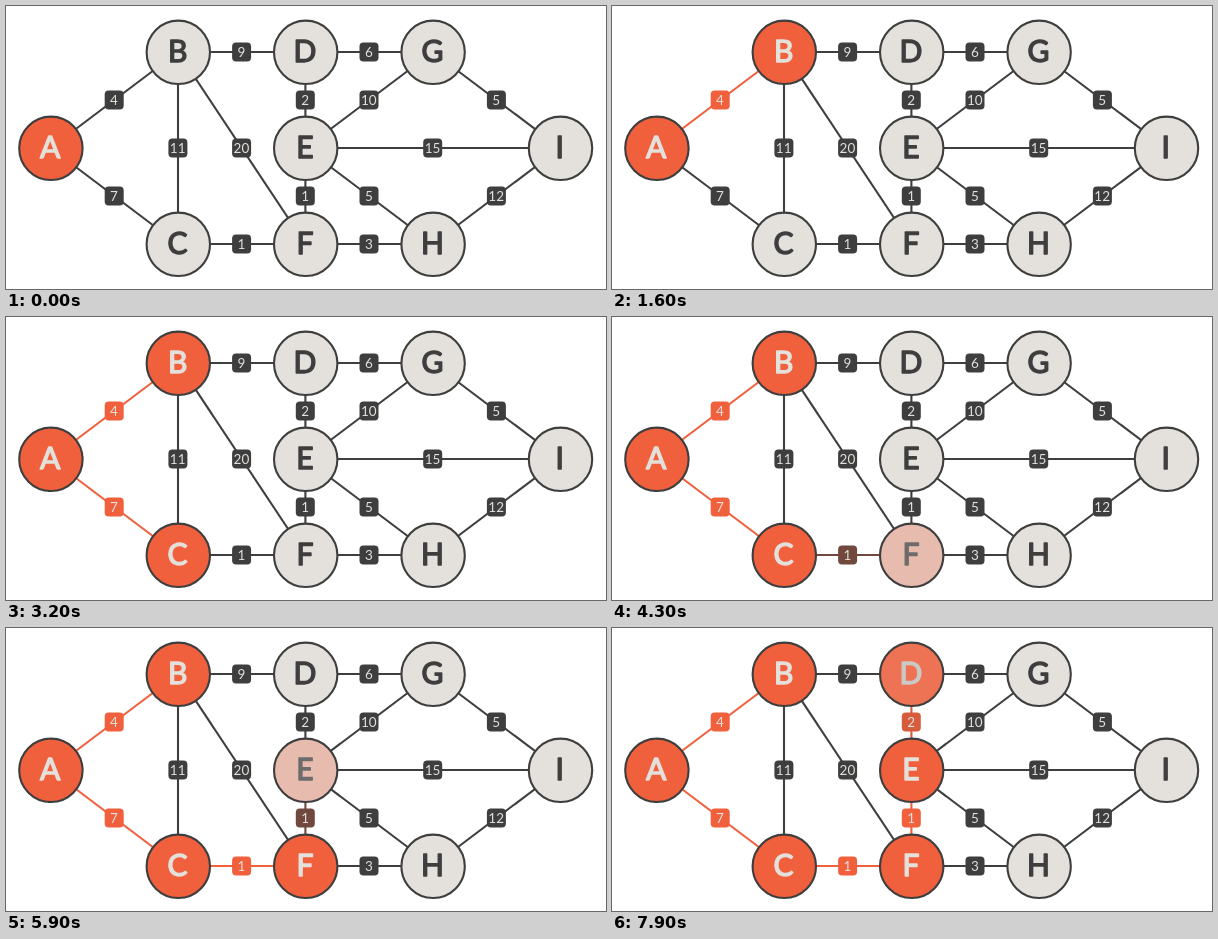
An HTML page for the animation above (8000 ms loop, 600 px wide and 283 px high).

```html
<!DOCTYPE html>
<html lang="en">
<head>
<meta charset="utf-8">
<title>Spanning tree</title>
<style>
  html, body { margin: 0; width: 100%; height: 100%; overflow: hidden; background: #fff; }
  svg { display: block; width: 100%; height: 100%; }
  text { font-family: Lato, "Open Sans", sans-serif; text-anchor: middle; }
  line { stroke-width: 2.1; }
  circle { stroke: #3e3e3e; stroke-width: 2.1; }
  .letter { font-size: 30px; stroke-width: 1.4; stroke-linejoin: round; }
  .weight { font-size: 13.5px; fill: #e4e0db; }
</style>
</head>
<body>
<svg id="stage" viewBox="0 0 600 283"></svg>
<script>
const LOOP = 8000, FIRST = 1000, GAP = 1600, STEP = 100, STEPS = 7;
const DARK = [62, 62, 62], LIGHT = [228, 224, 219], ORANGE = [240, 96, 61];

// column and row of each node
const grid = {
  A: [0, 1], B: [1, 0], C: [1, 2], D: [2, 0], E: [2, 1],
  F: [2, 2], G: [3, 0], H: [3, 2], I: [4, 1]
};
const weights = {
  AB: 4, AC: 7, BC: 11, BD: 9, BF: 20, CF: 1, DE: 2, DG: 6,
  EF: 1, EG: 10, EH: 5, EI: 15, FH: 3, GI: 5, HI: 12
};
// each stage marks one edge and the node it reaches
const stages = [["AB", "B"], ["AC", "C"], ["CF", "F"], ["EF", "E"], ["DE", "D"]];

const stage = document.getElementById("stage");

function add(tag, attrs, text = "") {
  const el = document.createElementNS("http://www.w3.org/2000/svg", tag);
  for (const key in attrs) el.setAttribute(key, attrs[key]);
  el.textContent = text;
  return stage.appendChild(el);
}

function mix(from, to, k) {
  return `rgb(${from.map((v, i) => Math.round(v + (to[i] - v) * k))})`;
}

const place = name => [44.6 + 127.4 * grid[name][0], 46 + 96 * grid[name][1]];
const edges = {}, nodes = {};

for (const name in weights) {
  const [x1, y1] = place(name[0]), [x2, y2] = place(name[1]);
  edges[name] = { line: add("line", { x1, y1, x2, y2 }) };
}

for (const name in weights) {
  const [x1, y1] = place(name[0]), [x2, y2] = place(name[1]);
  const x = (x1 + x2) / 2, y = (y1 + y2) / 2;
  edges[name].badge = add("rect", { x: x - 9.6, y: y - 9.5, width: 19, height: 19, rx: 4 });
  add("text", { class: "weight", x: x - 0.3, y: y + 4.7 }, weights[name]);
}

for (const name in grid) {
  const [x, y] = place(name);
  nodes[name] = {
    disc: add("circle", { cx: x + 0.3, cy: y + 0.3, r: 31.7 }),
    letter: add("text", { class: "letter", x: x - 0.4, y: y + 9.6 }, name)
  };
}

function paintEdge(name, k) {
  const color = mix(DARK, ORANGE, k);
  edges[name].line.style.stroke = color;
  edges[name].badge.style.fill = color;
}

function paintNode(name, k) {
  const { disc, letter } = nodes[name], color = mix(DARK, LIGHT, k);
  disc.style.fill = mix(LIGHT, ORANGE, k);
  letter.style.fill = letter.style.stroke = color;
}

function draw(t) {
  stages.forEach(([edge, node], i) => {
    const step = Math.floor((t - FIRST - GAP * i) / STEP) + 1;
    const k = Math.min(1, Math.max(0, step / STEPS));
    paintEdge(edge, k);
    paintNode(node, k);
  });
}

Object.keys(edges).forEach(name => paintEdge(name, 0));
Object.keys(nodes).forEach(name => paintNode(name, name === "A" ? 1 : 0));

const start = performance.now();
function tick() {
  draw((performance.now() - start) % LOOP);
  requestAnimationFrame(tick);
}
tick();
</script>
</body>
</html>
```
